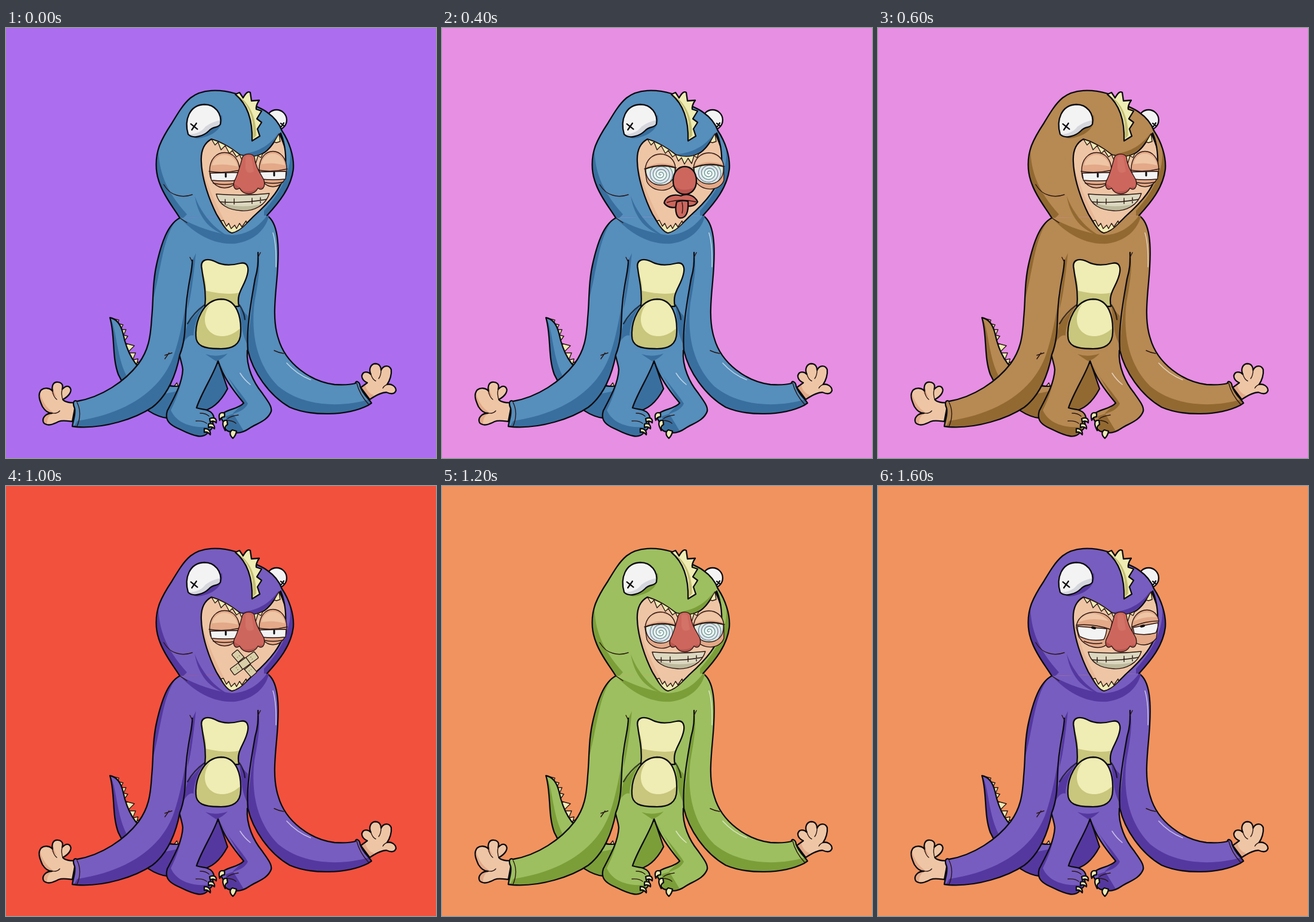
An HTML page for the animation above (1.8 s loop, 720 px wide and 720 px high).

```html
<!DOCTYPE html>
<html lang="en">
<head>
<meta charset="utf-8">
<title>Dinosaur suit</title>
<style>
  html, body { margin: 0; height: 100%; overflow: hidden; }
  svg { display: block; width: 100vw; height: 100vh; background: var(--bg); }
  .suit { fill: var(--suit); }
  .shade { fill: var(--shade); }
  .ink { stroke: #0b0b0f; stroke-width: 2.3; stroke-linejoin: round; stroke-linecap: round; }
  .fine { stroke: #2a1613; stroke-width: 1.4; stroke-linejoin: round; stroke-linecap: round; }
  .line { fill: none; }
  .cream { fill: #efecb4; }
  .olive { fill: #c9c67d; }
  .skin { fill: #eec6a6; }
  .lid { fill: #e3a988; }
  .nose { fill: #cd675d; }
  .white { fill: #f3f3f3; }
  .rainbow { fill: url(#pastel); }
  .glint { fill: none; stroke: #fff; stroke-opacity: .6; stroke-width: 1.6; stroke-linecap: round; }
  .option { display: none; }
  .option.on { display: inline; }
</style>
</head>
<body>
<svg id="stage" viewBox="0 0 720 720"></svg>
<script>
const stage = document.getElementById('stage');
let clips = 0;

const path = (cls, d, extra = '') => `<path class="${cls}" d="${d}" ${extra}/>`;

// A filled, outlined shape with shading kept inside its edge.
function part(cls, d, shading = '', stroke = 'ink') {
  const id = 'clip' + clips++;
  return `<clipPath id="${id}"><path d="${d}"/></clipPath>` + path(cls, d) +
    `<g clip-path="url(#${id})">${shading}</g>` + path(stroke + ' line', d);
}

const shade = d => path('shade', d);
const option = (name, content) => `<g class="option" data-name="${name}">${content}</g>`;
const cross = (x, y, r) => path('ink line', `M${x - r} ${y - r * .8}l${2 * r} ${1.6 * r}M${x + r * .7} ${y - r}l${-1.4 * r} ${2 * r}`);

const tail =
  path('cream fine', 'M181 487l8 2-2 6zM188 495l8 2-4 8zM193 505l8 0-4 9zM196 514l8 2-5 7zM200 528l15 4-11 11zM204 544l13 0-5 12zM211 556l10-2-3 12zM217 562l10-5-1 12zM270 602l5-5 4 6zM280 602l6-8 3 8z') +
  part('suit', 'M174 485C185 487 192 495 196 512C203 545 215 565 240 585C265 602 288 602 300 597L356 560L371 604C360 625 345 640 325 642L270 653C237 650 203 613 188 580C177 550 183 515 174 485Z',
    shade('M174 485C186 500 184 560 208 592C235 618 262 616 296 605L360 555L380 610L320 650L270 655C235 655 180 600 180 545Z'));

const body =
  path('suit', 'M291 318L437 314L430 400L405 545L290 547L305 400Z') +
  part('suit', 'M290 545C292 556 295 562 296 572C295 595 282 618 270 641C266 655 272 662 283 668C296 674 307 681 320 683C330 685 337 681 339 675C346 672 348 664 346 660C351 654 347 644 339 641C334 638 328 639 319 636C327 611 349 578 355 557C364 585 379 605 398 628C390 637 375 638 365 644C359 649 360 656 365 660C365 670 369 676 377 676C387 680 398 677 408 670C420 662 438 658 444 642C446 634 438 624 428 610C415 594 402 568 404 540',
    shade('M290 547C303 575 290 612 276 640C286 662 310 670 342 668L338 690L265 670L265 640Z') +
    shade('M355 557C372 590 394 610 405 629C400 640 388 644 368 650L371 680L400 678L380 645L398 628Z')) +
  shade('M334 546Q352 552 371 545Q363 554 352 558Q344 553 334 546Z') +
  shade('M304 495L332 464C321 478 314 502 314 515C307 512 298 522 292 538Z') +
  shade('M391 468L405 482L404 530C399 520 396 510 395 500Z') +
  shade('M312 389C311 420 304 450 304 470C310 450 314 415 318 377Z') +
  path('ink line', 'M332 464Q314 477 304 495M391 464Q399 476 400 488', 'stroke-opacity=".7"') +
  path('fine line', 'M325 645q10 0 15 5M318 658q12-1 18 4M372 657q9 1 13 5M389 648q-13 2-18 6') +
  path('cream ink', 'M341 654c8-3 12 0 11 7q-5-5-10-1zM339 663c7-2 11 2 10 8q-5-5-10-2zM332 671c7-1 11 4 10 10q-5-6-10-4zM366 645c-8-3-11 2-8 12q2-6 8-6zM370 657c-8-1-9 6-3 17q-1-8 4-10zM379 673c-5 3-5 9 1 14q5-5 6-12z') +
  path('glint', 'M392 578q7 11 17 19');

const belly =
  part('cream', 'M328 404C324 387 337 385 350 391C364 399 380 397 392 394C405 391 407 402 404 413C399 434 385 443 390 466L333 468C336 440 330 422 328 404Z',
    path('olive', 'M322 390Q337 425 335 440Q370 448 392 443L390 470L330 470Z')) +
  part('cream', 'M318 514C317 493 329 455 360 454C387 454 394 485 393 509C393 530 380 538 356 537C333 537 317 533 318 514Z',
    path('olive', 'M312 490L342 462C328 482 330 505 350 514C365 519 380 515 395 500L400 545H310Z'));

const hands =
  part('skin', 'M117 627C109 628 99 627 95 622C107 616 112 606 106 601C101 598 97 602 94 605C97 596 91 592 84 593C78 594 76 602 78 608C73 602 64 602 59 606C52 614 57 625 61 634C66 642 72 645 77 645C67 645 59 653 63 661C70 668 80 663 88 659C95 656 103 658 111 659Z',
    path('lid', 'M55 605Q62 634 80 644Q67 650 69 666L58 668L52 620ZM78 598Q81 614 86 619L76 612Z')) +
  path('fine line', 'M77 645q9 1 13-4M78 608q1 9 7 14M94 605q-2 8 1 17') +
  part('skin', 'M594 602L605 594C596 590 593 582 599 577C604 575 608 577 611 580C607 572 610 563 618 562C625 562 628 567 628 573C632 564 642 564 645 572C646 580 643 590 638 597C645 595 653 600 653 607C650 615 642 612 637 610C628 610 618 616 609 622Z',
    path('lid', 'M594 600L601 596Q604 611 616 615L607 624Z')) +
  path('fine line', 'M611 580q3 9 8 11M628 573q0 9-4 14M638 597q-5 2-7 6');

const arms =
  part('suit', 'M291 318C270 329 260 362 253 392C245 425 247 455 244 485C242 520 238 540 222 562C199 592 160 618 119 625C113 622 111 628 115 637C117 648 112 658 111 667L119 668C165 671 217 654 245 635C271 615 285 580 291 547C304 515 298 480 304 445C307 420 312 405 312 389',
    shade('M288 318C262 350 262 395 246 455L240 440L252 340Z') +
    shade('M312 389C303 455 295 505 282 545C262 605 205 645 119 658L110 675L220 672L300 600Z')) +
  path('fine line', 'M119 627q9 18 0 40M273 544l-7 10M308 384l4 8M266 548l12-4') +
  part('suit', 'M437 314C456 326 457 365 455 400C453 440 444 484 456 520C468 562 510 592 550 597C565 598 578 597 585 595C585 590 592 591 593 600C598 614 607 620 612 628L606 632C570 650 510 650 475 635C440 615 413 575 405 540C402 500 412 450 417 420C423 400 422 388 422 376',
    shade('M422 374C427 400 422 425 416 460C409 521 424 568 456 600C497 634 560 636 608 622L616 640L500 660L400 570Z')) +
  path('fine line', 'M587 594q5 20 20 36M426 376l-4 8M449 540q8 4 16 5') +
  path('glint', 'M447 343Q453 362 452 400M470 561Q487 580 510 589');

const hood =
  `<circle class="white ink" cx="453" cy="154" r="17"/>` + cross(463, 162, 3) +
  part('suit', 'M291 318C280 300 266 284 258 262C249 240 250 216 257 197C262 184 270 171 278 159C287 144 296 128 309 117C328 102 357 102 385 110C405 129 424 131 437 141C450 150 458 161 462 172C474 190 483 215 481 237C477 268 457 292 437 314',
    shade('M255 200C256 245 270 275 303 312L290 325L248 260Z') +
    shade('M474 195C481 225 470 264 432 306L432 322L490 270L485 200Z') +
    shade('M361 145C366 164 350 178 334 182Q319 188 311 181Q343 181 361 145Z') +
    shade('M391 212C412 209 436 204 456 176C443 208 414 222 391 212Z')) +
  shade('M291 318C310 338 342 364 384 361C414 357 435 338 440 315L437 314C420 337 400 346 378 347C348 343 322 334 291 318Z') +
  shade('M316 281C324 304 344 334 372 348C342 340 322 318 316 281Z') +
  path('fine line', 'M264 262q9 15 22 18M286 280q12 4 26-1M291 318q6 4 12 8') +
  path('cream ink', 'M384 111L391 108L397 117Q404 104 409 108L411 122L424 121Q418 130 419 136L428 139L420 152L428 158L421 169L425 181L412 189C413 158 407 130 384 111Z') +
  path('', 'M389 114C411 134 416 157 413 186L419 180C419 150 408 125 389 114Z', 'fill="#c3be72"') +
  part('white', 'M305 178C298 154 307 129 332 128C350 128 362 143 359 161C355 168 347 164 340 172C330 182 313 186 305 178Z',
    path('', 'M303 178Q325 178 334 165Q346 156 361 154L360 190H300Z', 'fill="#d5d7dd"')) + cross(315, 165, 5.5);

const face =
  part('skin', 'M344 186C331 193 326 206 327 224C328 254 341 289 352 311C361 326 369 341 378 343C390 341 402 328 415 315C443 290 463 266 467 240C470 219 468 195 460 176C451 184 444 205 426 212C414 218 401 217 391 212C378 202 362 191 344 186Z',
    path('lid', 'M326 225Q345 290 378 343L350 335L322 260Z', 'opacity=".5"') +
    path('', 'M455 174L470 176V214Q464 192 455 174Z', 'fill="#0b0b0f"')) +
  path('cream fine', 'M344 186L350 196L355 191L360 204L367 197L374 210L379 205L386 216L391 212L396 223L401 217L406 228L412 218L418 227L422 214L427 217L430 210Q412 219 391 212Q370 194 344 186ZM449 191L457 177L459 190L453 192Z') +
  path('cream fine', 'M360 323L364 322L369 332L373 327L377 336L383 330L386 336L391 327L395 333L402 323L403 327Q390 341 378 343Q369 340 360 323Z');

// One eyelid pair with a slit of white between, centred on x, y.
const sleepyEye = (x, y, w) =>
  path('lid fine', `M${x - w} ${y}C${x - w - 1} ${y - 42} ${x + w + 1} ${y - 42} ${x + w} ${y}C${x + w} ${y + 37} ${x - w} ${y + 37} ${x - w} ${y}Z`) +
  path('skin', `M${x - w + 4} ${y - 10}C${x - 16} ${y - 34} ${x + 17} ${y - 34} ${x + w - 3} ${y - 8}Q${x} ${y - 14} ${x - w + 4} ${y - 10}Z`) +
  path('white fine', `M${x - w + 1} ${y + 3}L${x + w - 1} ${y + 2}L${x + w - 2} ${y + 15}Q${x} ${y + 17} ${x - w + 3} ${y + 15}Z`) +
  path('ink line', `M${x + 2} ${y + 4}v5`, 'style="stroke-width:3"') +
  path('fine line', `M${x - w - 1} ${y}Q${x} ${y + 4} ${x + w + 1} ${y - 2}M${x - w + 6} ${y + 20}q${w - 6} 4 ${2 * w - 12} 0`);

function spiral(x, y) {
  let d = `M${x} ${y}`;
  for (let a = .3; a < 26; a += .3) {
    d += `L${(x + a * .8 * Math.cos(a)).toFixed(1)} ${(y + a * .75 * Math.sin(a)).toFixed(1)}`;
  }
  return path('line', d, 'stroke="#5f8b8c" stroke-width="1.2"');
}

const dizzyEye = (x, y) =>
  path('lid fine', `M${x - 26} ${y - 7}C${x - 24} ${y - 43} ${x + 23} ${y - 42} ${x + 25} ${y - 10}V${y + 12}C${x + 18} ${y + 32} ${x - 14} ${y + 31} ${x - 23} ${y + 12}Z`) +
  path('skin', `M${x - 23} ${y - 13}C${x - 20} ${y - 38} ${x + 18} ${y - 38} ${x + 23} ${y - 15}Q${x} ${y - 23} ${x - 23} ${y - 13}Z`) +
  part('rainbow', `M${x - 25} ${y - 9}Q${x} ${y - 18} ${x + 24} ${y - 11}C${x + 26} ${y + 8} ${x + 15} ${y + 18} ${x} ${y + 18}C${x - 15} ${y + 18} ${x - 25} ${y + 7} ${x - 25} ${y - 9}Z`, spiral(x, y), 'fine') +
  path('fine line', `M${x - 27} ${y - 9}Q${x} ${y - 20} ${x + 26} ${y - 11}`);

const slyEyes =
  path('lid fine', 'M332 237C333 207 380 202 392 228L385 263C374 277 346 270 336 252ZM425 234C427 205 463 197 470 224L466 255C455 269 438 269 427 259Z') +
  path('skin', 'M336 228C345 209 371 210 386 226Q358 219 336 228ZM429 226C437 209 457 207 467 220Q449 217 429 226Z') +
  path('white fine', 'M334 235L383 239Q382 250 378 257Q356 261 338 252Q334 245 334 235ZM427 237L469 229Q469 239 465 246Q448 251 429 247Z') +
  path('ink line', 'M359 237l4 1M441 235l4-1', 'style="stroke-width:4"') +
  path('fine line', 'M332 233Q360 230 389 240M425 236Q447 226 470 226M345 260q16 6 30 3');

const bigNose = part('nose', 'M396 216C401 209 413 210 416 216C418 235 427 244 432 255C435 268 428 273 422 268C415 281 398 281 391 268C385 273 379 268 382 257C389 244 391 234 396 216Z',
  path('', 'M379 259Q389 264 398 273Q412 276 425 266L436 266L430 285H380Z', 'fill="#b9554f"') +
  path('', 'M401 216Q406 212 411 217L415 240Q404 247 401 235Z', 'fill="#d87a6f" opacity=".6"'), 'fine');
const roundNose = part('nose', 'M387 256C387 224 426 224 426 256C426 286 387 286 387 256Z',
  path('', 'M386 260Q397 278 426 266L422 285H388Z', 'fill="#b9554f"'));

const grin = part('', 'M352 278Q397 282 441 277C435 297 415 307 395 306C371 305 356 295 352 278Z',
  path('', 'M350 276H443V310H350Z', 'fill="#dcd8bf"') +
  path('', 'M350 286Q380 306 432 294L410 312H360Z', 'fill="#bdb99d"') +
  path('fine line', 'M357 291Q397 294 436 287M367 287v8M382 286v9M412 285v9M426 284v9'), 'fine');

const lips =
  path('nose ink', 'M372 293C374 282 388 277 400 281C410 276 423 280 428 291C424 299 412 300 402 296C391 303 378 302 372 293Z') +
  path('fine line', 'M377 292Q400 285 425 291') +
  path('nose ink', 'M393 291C390 302 391 315 398 318C409 319 413 308 412 290Q402 288 393 291Z') +
  path('fine line', 'M402 292q2 10 0 18');

const smirk = path('nose fine', 'M404 292Q412 285 419 288Q420 294 411 295Z') +
  path('ink line', 'M392 301Q400 292 418 292');

const strip = angle =>
  `<g transform="translate(399 297) rotate(${angle})"><rect class="fine" x="-25" y="-6.5" width="50" height="13" rx="2" fill="#d9cfa8"/>` +
  `<path class="fine line" d="M-8-6V6M8-6V6"/><path d="M-16-2h2M-16 2h2M14-2h2M14 2h2" stroke="#7c6b4b"/></g>`;
const plaster = strip(49) + strip(-36);

stage.innerHTML =
  '<defs><radialGradient id="pastel"><stop offset="0" stop-color="#fff"/><stop offset=".4" stop-color="#e6f3ee"/><stop offset=".7" stop-color="#e4e0ef"/><stop offset="1" stop-color="#dcebdc"/></radialGradient></defs>' +
  tail + body + belly + hands + arms + hood + face +
  option('sleepy', sleepyEye(366, 240, 25) + sleepyEye(447, 238, 23)) +
  option('dizzy', dizzyEye(366, 245) + dizzyEye(447, 243)) +
  option('sly', slyEyes) +
  option('grin', grin) + option('lips', lips) + option('smirk', smirk) + option('plaster', plaster) +
  option('big', bigNose) + option('round', roundNose);

const suits = {
  blue: ['#568ebc', '#396f9f'],
  brown: ['#b78953', '#936932'],
  purple: ['#775dbf', '#55389f'],
  green: ['#9dbf60', '#7b9e39']
};
const backs = { violet: '#ac6eef', pink: '#e78fe3', red: '#f2513e', orange: '#f1935f' };

// Background, suit, eyes, nose, mouth.
const looks = [
  'violet blue sleepy big grin',
  'violet blue dizzy big smirk',
  'pink blue dizzy round lips',
  'pink brown sleepy big grin',
  'pink brown dizzy big smirk',
  'red purple sleepy big plaster',
  'orange green dizzy big grin',
  'orange purple dizzy big grin',
  'orange purple sly big grin'
].map(look => look.split(' '));

const options = [...stage.querySelectorAll('.option')];
const start = performance.now();
let current = -1;

function draw(now) {
  const index = Math.floor(Math.max(0, now - start) / 200) % looks.length;
  if (index !== current) {
    current = index;
    const [back, suit, ...parts] = looks[index];
    stage.style.setProperty('--bg', backs[back]);
    stage.style.setProperty('--suit', suits[suit][0]);
    stage.style.setProperty('--shade', suits[suit][1]);
    for (const item of options) item.classList.toggle('on', parts.includes(item.dataset.name));
  }
  requestAnimationFrame(draw);
}
draw(start);
</script>
</body>
</html>
```
